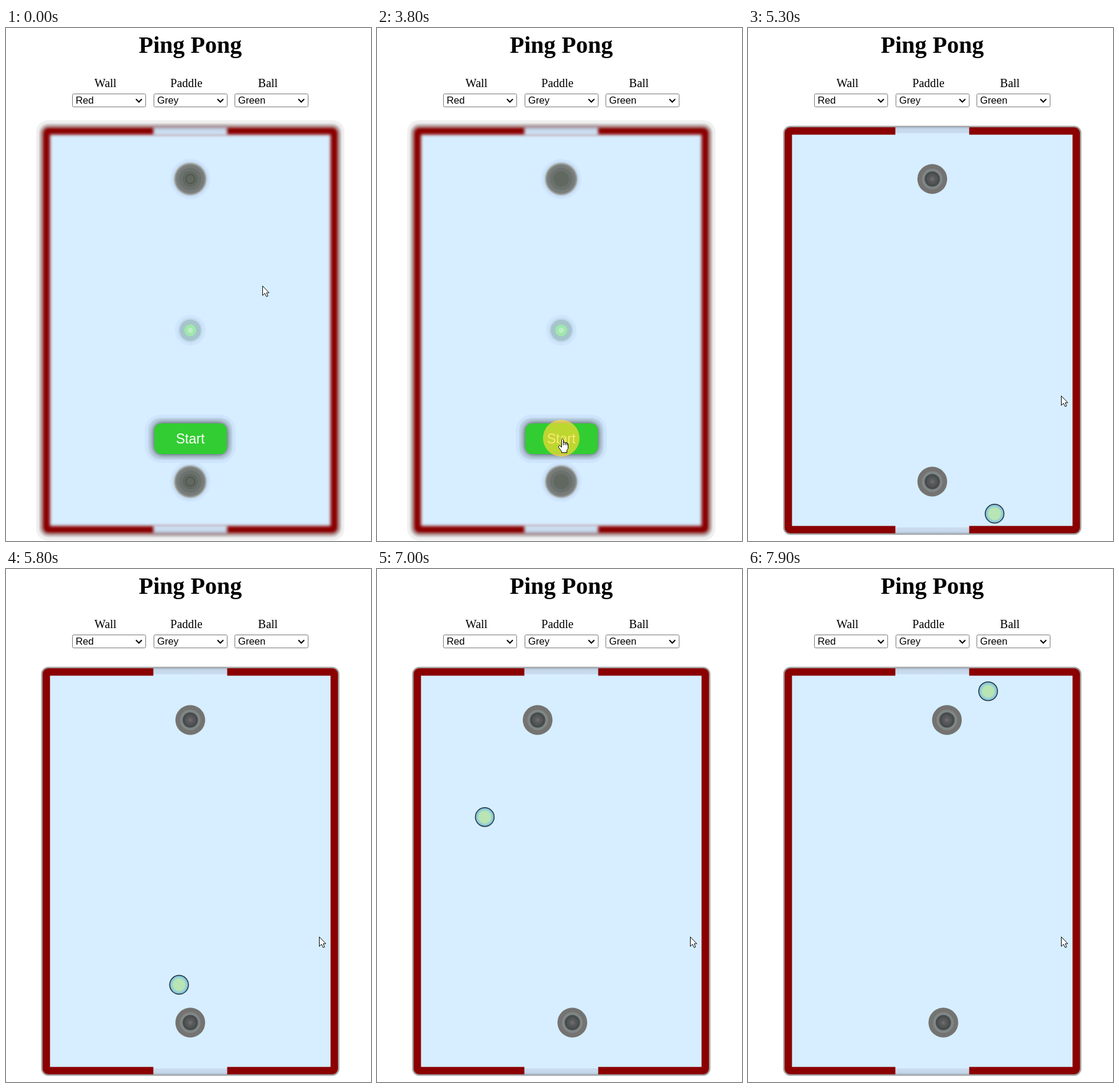
Write an HTML page with a canvas that moves like this. It is 618 px wide and 868 px high and loops after 8 s.

```html
<!DOCTYPE html>
<html lang="en">
<head>
<meta charset="utf-8">
<title>Ping Pong</title>
<style>
  html, body { margin: 0; width: 100%; height: 100%; overflow: hidden; background: #fff; }
  canvas { display: block; }
</style>
</head>
<body>
<canvas id="stage" width="618" height="868"></canvas>
<script>
const ctx = document.getElementById('stage').getContext('2d');
const LOOP = 8000, STEP = 100;
const CLICK = 3800, PLAY = 4000, SERVE = 3935;
const ICE = '#d6eeff', WALL = '#8b0000';
const SANS = '"Liberation Sans", Arial, sans-serif';
const SERIF = '"Liberation Serif", "Times New Roman", serif';

const clamp = (v, a, b) => Math.min(b, Math.max(a, v));

function box(x, y, w, h, r, fill, stroke, line = 1) {
  ctx.beginPath();
  ctx.roundRect(x, y, w, h, r);
  if (fill) { ctx.fillStyle = fill; ctx.fill(); }
  if (stroke) { ctx.strokeStyle = stroke; ctx.lineWidth = line; ctx.stroke(); }
}

function disc(x, y, r, fill) {
  ctx.beginPath();
  ctx.arc(x, y, r, 0, Math.PI * 2);
  ctx.fillStyle = fill;
  ctx.fill();
}

function rings(x, y, list) {
  for (const [r, fill] of list) disc(x, y, r, fill);
}

function text(str, x, y, font, align = 'center', fill = '#000') {
  ctx.font = font;
  ctx.textAlign = align;
  ctx.fillStyle = fill;
  ctx.fillText(str, x, y);
}

function select(label, value, x, mid) {
  text(label, mid, 100, '20px ' + SERIF);
  box(x + 0.5, 111.5, 124, 22, 2, '#fff', '#767676');
  text(value, x + 6, 128, '16.67px ' + SANS, 'left');
  ctx.beginPath();
  ctx.moveTo(x + 108, 120.3);
  ctx.lineTo(x + 113, 125.3);
  ctx.lineTo(x + 118, 120.3);
  ctx.strokeStyle = '#000';
  ctx.lineWidth = 2;
  ctx.stroke();
}

function header() {
  text('Ping Pong', 312, 42, 'bold 40px ' + SERIF);
  select('Wall', 'Red', 112, 168.5);
  select('Paddle', 'Grey', 250, 305.5);
  select('Ball', 'Green', 387, 443.5);
}

function goal(edge, dir) {
  const g = ctx.createLinearGradient(0, edge, 0, edge + dir * 15);
  [[0, '#98a8b4'], [0.12, '#b4c6d6'], [0.3, '#c6d8ea'], [0.74, '#cadcf0'], [0.76, ICE], [1, ICE]]
    .forEach(s => g.addColorStop(...s));
  ctx.fillStyle = g;
  ctx.fillRect(249.5, Math.min(edge, edge + dir * 15), 125, 15);
}

function board() {
  box(60.75, 166.75, 502.5, 689.5, 11, WALL, '#a2a2a2', 2.5);
  ctx.fillStyle = ICE;
  ctx.fillRect(74.5, 180.5, 475, 662);
  goal(167, 1);
  goal(856, -1);
}

function blurredBoard() {
  box(51, 156, 522, 711, 20, '#f0f0f0');
  box(56, 161, 512, 701, 16, '#e3e3e3');
  ctx.save();
  ctx.filter = 'blur(2.8px)';
  board();
  ctx.restore();
}

const softPaddle = [[34, '#cfe5fd'], [30, '#c4d8e8'], [27.5, '#a6aeae'], [26, '#8b908e'],
  [24, '#777b7a'], [19, '#6b716d'], [13, '#61685f']];
const softBall = [[26, '#cfe5fd'], [21, '#c2daea'], [18, '#a5c4cc'], [10, '#9fe8ac'], [4.5, '#bdeec6']];
const hardPaddle = [[25.2, '#747371'], [17.5, '#7f8786'], [13, '#484c4d'], [9, '#545657'], [5, '#606061'], [2, '#707070']];
const hardBall = [[16.7, '#2b3b49'], [15, '#8ac9dc'], [12.5, '#a2d6c8'], [10.5, '#b8e5b3']];

function startButton() {
  box(235, 654, 154, 82, 27, '#cee5fd');
  box(241, 660, 142, 70, 20, '#c2d8ea');
  ctx.save();
  ctx.shadowColor = 'rgba(0,0,0,.75)';
  ctx.shadowBlur = 11;
  box(251, 669, 123, 52, 12, '#32cd32');
  ctx.restore();
  text('Start', 312, 703, '23px ' + SANS, 'center', '#fff');
}

function shape(x, y, pts) {
  ctx.beginPath();
  for (let i = 0; i < pts.length; i += 2) ctx.lineTo(x + pts[i], y + pts[i + 1]);
  ctx.closePath();
  ctx.fillStyle = '#fff';
  ctx.fill();
  ctx.strokeStyle = '#000';
  ctx.lineWidth = 1;
  ctx.stroke();
}

function arrow(x, y) {
  shape(x + 0.5, y + 0.5, [0, 0, 0, 16, 3.7, 12.5, 6.5, 18, 9, 17, 6.5, 11.5, 11, 11.5]);
}

function hand(x, y) {
  shape(x + 0.5, y + 0.5, [0, 1, 1, 0, 2, 0, 3, 1, 3, 6, 5, 5, 6, 7, 8, 6, 9, 8, 11, 8,
    11, 16, 9, 19, 9, 23, 0, 23, 0, 21, -5, 14, -5, 12, -3, 11, 0, 14]);
  ctx.beginPath();
  for (const dx of [3.5, 6.5, 9.5]) {
    ctx.moveTo(x + dx, y + 6);
    ctx.lineTo(x + dx, y + 11);
  }
  ctx.stroke();
}

function ripple(t) {
  const k = clamp((t - 3930) / 310, 0, 1);
  if (t < CLICK || k === 1) return;
  disc(312, 694, 31 + 30 * k, `rgba(255,220,50,${0.68 * (1 - k)})`);
}

// Fold a straight path back and forth between two walls.
function bounce(v, lo, hi) {
  const span = hi - lo;
  const m = (((v - lo) % (2 * span)) + 2 * span) % (2 * span);
  return lo + (m < span ? m : 2 * span - m);
}

const ballX = t => bounce(312 + 0.249 * (t - SERVE), 88.35, 534.7);
const ballY = t => bounce(512 + 0.2365 * (t - SERVE), 194, 828.3);

// The upper paddle chases the ball left, then turns when they meet.
function rivalX(t) {
  const speed = 0.146, go = 6726, turn = 7228;
  return 312 - speed * clamp(t - go, 0, turn - go) + speed * Math.max(0, t - turn);
}

const playerX = t => 312 + 6.25 * [6000, 6500, 6800].filter(k => t >= k).length;

function pointer(t) {
  if (t < CLICK) return arrow(434, 436);
  if (t < PLAY) return hand(312, 695);
  const k = clamp((t - 4300) / 700, 0, 1);
  const e = k * k * (3 - 2 * k);
  arrow(Math.round(312 + 218 * e), Math.round(694 - 72 * e));
}

function draw(t) {
  ctx.fillStyle = '#fff';
  ctx.fillRect(0, 0, 618, 868);
  header();
  if (t < PLAY) {
    blurredBoard();
    for (const y of [255.5, 767.5]) {
      rings(312, y, softPaddle);
      if (t < STEP) {
        ctx.beginPath();
        ctx.arc(312, y, 7.5, 0, Math.PI * 2);
        ctx.strokeStyle = '#4c524f';
        ctx.lineWidth = 1.5;
        ctx.stroke();
      }
    }
    rings(312, 511.5, softBall);
    startButton();
  } else {
    board();
    rings(rivalX(t), 255.5, hardPaddle);
    rings(playerX(t), 767.5, hardPaddle);
    rings(ballX(t), ballY(t), hardBall);
  }
  ripple(t);
  pointer(t);
}

let shown = -1;
const began = performance.now();
function tick() {
  const t = Math.floor(((performance.now() - began) % LOOP) / STEP) * STEP;
  if (t !== shown) draw(shown = t);
  requestAnimationFrame(tick);
}
tick();
</script>
</body>
</html>
```
